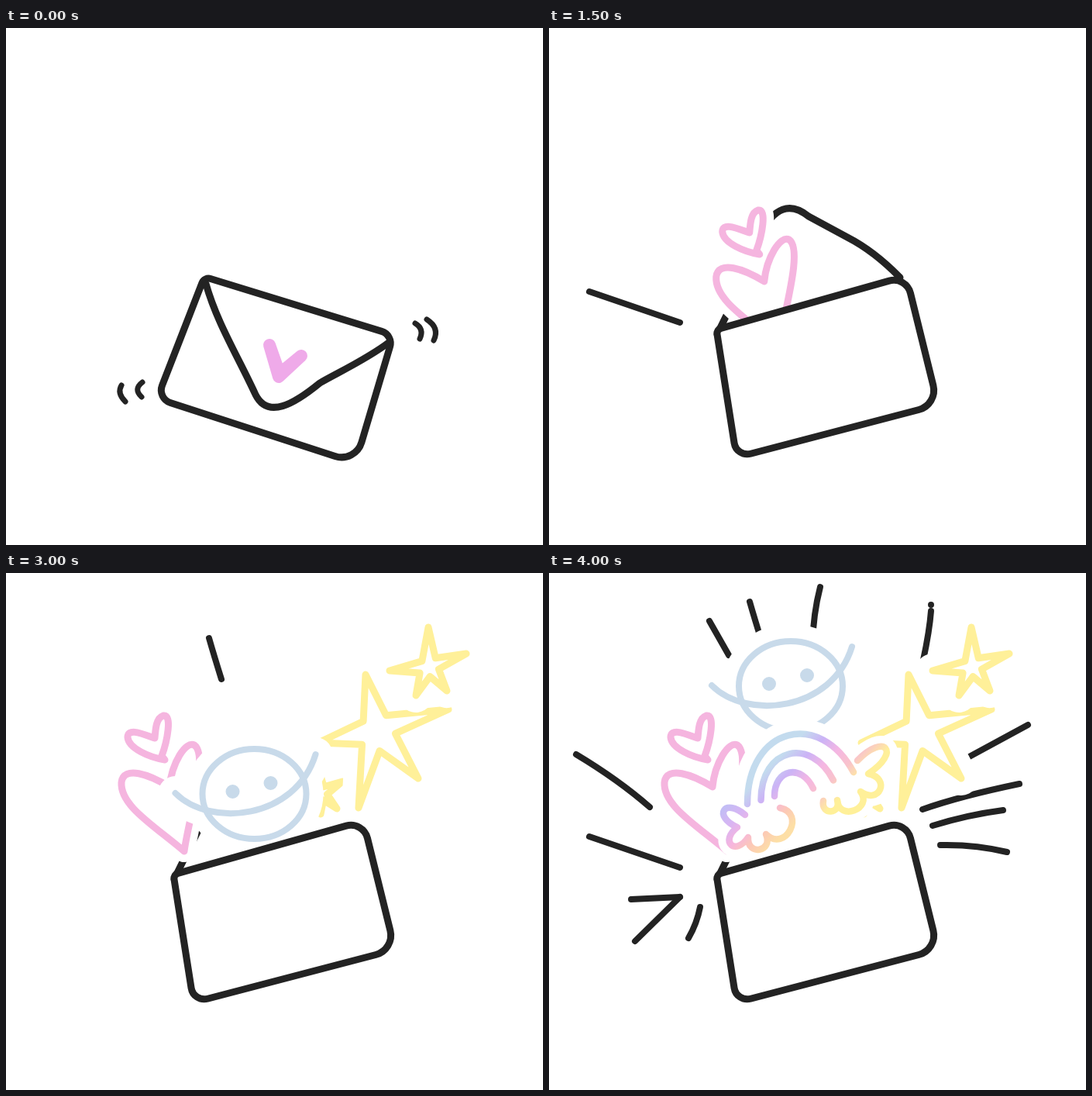
An HTML page with a canvas for the animation above (4.25 s loop, 693 by 667 pixels).

```html
<!DOCTYPE html>
<html>
<head>
<meta charset="utf-8">
<style>
html, body { margin: 0; width: 100%; height: 100%; overflow: hidden; background: #fff; }
canvas { display: block; }
</style>
</head>
<body>
<canvas id="stage" width="693" height="667"></canvas>
<script>
const ctx = document.getElementById('stage').getContext('2d');
const INK = '#232323', PINK = '#f5b5df', YELLOW = '#fff099', BLUE = '#c8daea';
const STEP = 250, STEPS = 17, FULL = 16;

const shape = d => new Path2D(d);
const mix = (a, b, k) => a.map((v, i) => v + (b[i] - v) * k);

// Closed quad; corners are [x, y, radius]
function roundedQuad(corners) {
  const path = new Path2D();
  path.moveTo(...mix(corners[3], corners[0], 0.5).slice(0, 2));
  corners.forEach(([x, y, r], i) => path.arcTo(x, y, ...corners[(i + 1) % 4].slice(0, 2), r));
  path.closePath();
  return path;
}

// Five tips; each notch lies between two tips, pulled towards the centre
function star(centre, tips) {
  const path = new Path2D();
  tips.forEach((tip, i) => {
    path.lineTo(...tip);
    path.lineTo(...mix(mix(tip, tips[(i + 1) % 5], 0.5), centre, 0.65));
  });
  path.closePath();
  return path;
}

// Row of bumps from start; each bump is [end x, end y, depth]
function cloud(start, bumps) {
  const path = new Path2D();
  path.moveTo(...start);
  let [x, y] = start;
  for (const [ex, ey, depth] of bumps) {
    const dx = ex - x, dy = ey - y, h = depth / 0.75 / Math.hypot(dx, dy);
    path.bezierCurveTo(x - dx / 4 - dy * h, y - dy / 4 + dx * h,
      ex + dx / 4 - dy * h, ey + dy / 4 + dx * h, ex, ey);
    [x, y] = [ex, ey];
  }
  return path;
}

// Rainbow bands shrink evenly towards the innermost
function band(i) {
  const x1 = 256 + 17.5 * i, y1 = 298 - 5 * i;
  return shape(`M${x1},${y1} C${x1},${y1 - 100 + 32 * i} ${350 - 12 * i},${176 + 35 * i} ${393 - 26 * i},${257 + 10.5 * i}`);
}

function stroke(path, color, width) {
  ctx.strokeStyle = color;
  ctx.lineWidth = width;
  ctx.stroke(path);
}

// White paper cut-out around the paths
function cutout(paths, width) {
  ctx.fillStyle = '#fff';
  paths.forEach(path => { ctx.fill(path); stroke(path, '#fff', width); });
}

function shifted(dx, dy, draw) {
  ctx.save();
  ctx.translate(dx, dy);
  draw();
  ctx.restore();
}

// Evenly spaced colors along the diagonal, between two values of x + y
function diagonal(from, to, colors) {
  const g = ctx.createLinearGradient(from / 2, from / 2, to / 2, to / 2);
  colors.forEach((color, i) => g.addColorStop(i / (colors.length - 1), color));
  return g;
}

const letter = roundedQuad([[256, 321, 9], [500, 396, 16], [451, 561, 27], [195, 478, 17]]);
const letterFlap = shape('M258,330 C272,380 300,425 322,473 C338,505 372,485 405,458 C425,446 465,428 495,405');
const shakeMarks = shape('M149,461 Q143,471 154,482 M176,457 Q164,466 175,476 M528,381 Q540,388 534,401 M543,376 Q560,387 552,403');
const seal = shape('M340,409 L352,450 L381,423 L353,446 Z');

const body = roundedQuad([[216, 389, 7], [461, 320, 22], [502, 486, 26], [242, 554, 17]]);
const flap = shape('M217,395 L258,312 L273,266 Q299,214 335,243 L385,270 Q420,288 453,322');

const hearts = [
  shape('M211,276 C185,260 152,248 149,270 C147,300 190,325 230,359 C235,320 262,235 243,222 C232,216 214,245 211,276'),
  shape('M192,213 C177,208 157,199 157,212 C158,226 185,238 205,241 L201,236 C208,217 215,182 203,184 C194,187 193,200 192,213')
];
const stars = [
  star([406, 285], [[402, 248], [434, 269], [427, 304], [406, 311], [361, 291]]),
  star([476, 200], [[464, 131], [571, 176], [532, 265], [455, 303], [403, 219]]),
  star([546, 122], [[545, 70], [594, 104], [569, 152], [529, 158], [495, 126]])
];

const face = new Path2D();
face.ellipse(312, 240, 67, 58, 0, 0, 2 * Math.PI);
const smile = shape('M210,239 C255,284 365,273 391,189');
const eyes = shape('M284,237 h0 M333,226 h0');

const bands = [0, 1, 2].map(band);
const leftCloud = cloud([253, 312], [[243, 328, 26], [257, 341, 22], [280, 337, 18], [298, 303, 25]]);
const rightCloud = cloud([354, 294], [[372, 293, 14], [402, 282, 20], [412, 259, 22], [398, 242, 38]]);
const rainbowInk = diagonal(535, 666, ['#c3dbee', '#cbb3f6', '#f4b6e3', '#f9c3cb', '#fff099']);
const cloudInk = diagonal(530, 640, ['#c3bdf5', '#d8b5f3', '#f6b5df', '#fcc9b6', '#fddfa6']);

// Burst lines with the steps in which they flash; all show in the last step
const burst = [
  ['M169,380 L52,340', 6, 7],
  ['M106,421 L169,418', 5, 7],
  ['M618,196 L535,241 M607,272 Q530,288 482,305', 9, 10],
  ['M493,41 h0 M493,49 Q491,75 483,112', 10],
  ['M35,234 Q90,267 130,302'],
  ['M111,475 L169,418 M505,351 Q550,350 591,360', 14],
  ['M180,471 Q191,452 195,431 M586,306 Q540,312 495,326', 15],
  ['M459,255 Q480,222 556,149', 8]
].map(([d, ...steps]) => [shape(d), steps]);
const ray = shape('M262,84 Q268,105 278,137');
const sideRays = shape('M210,109 L235,153 M353,65 Q344,100 343,139');

// Runs draw at the eased offset of a group rising from [dx, dy]
function emerge(step, start, duration, [dx, dy], draw) {
  if (step < start) return;
  const k = Math.min(1, (step - start) / duration);
  const left = (1 + Math.cos(Math.PI * k)) / 2;
  shifted(dx * left, dy * left, draw);
}

function drawClosed(tilted) {
  ctx.save();
  if (tilted) {
    ctx.translate(350, 433);
    ctx.rotate(-35 * Math.PI / 180);
    ctx.translate(-350, -433);
  }
  stroke(letter, INK, 9);
  stroke(letterFlap, INK, 9);
  stroke(shakeMarks, INK, 7);
  stroke(seal, '#efaae9', 16);
  ctx.restore();
}

function drawSmiley() {
  cutout([face, smile], 44);
  stroke(face, BLUE, 8);
  stroke(smile, BLUE, 8);
  stroke(eyes, BLUE, 18);
}

function drawRainbow() {
  cutout([bands[0]], 38);
  cutout([leftCloud, rightCloud], 28);
  bands.forEach(path => stroke(path, rainbowInk, 8.5));
  stroke(leftCloud, cloudInk, 8.5);
  stroke(rightCloud, rainbowInk, 8.5);
}

function drawOpen(step) {
  const last = step === FULL;
  burst.forEach(([path, steps], i) => {
    const flashOnly = i === burst.length - 1;
    if (steps.includes(step) || last && !flashOnly) stroke(path, INK, 8);
  });
  shifted(last ? -3 : 0, last ? -47 : 0, () => {
    if (step === 12 || step === 13 || last) stroke(ray, INK, 8);
    if (step === 13 || last) stroke(sideRays, INK, 8);
  });
  stroke(flap, INK, 9);

  emerge(step, 5, 3, [89, 68], () => {
    cutout(hearts, 28);
    hearts.forEach(path => stroke(path, PINK, 9));
  });
  emerge(step, 8, 2, [-127, 182], () => stars.forEach((path, i) => {
    cutout([path], i ? 44 : 66);
    stroke(path, YELLOW, 9);
  }));
  emerge(step, 11, 2, [17, 90], () => shifted(0, step > 13 ? -94 : 0, drawSmiley));
  emerge(step, 14, 2, [0, 88], drawRainbow);

  cutout([body], 0.1);
  stroke(body, INK, 9);
}

function frame() {
  const step = Math.floor(performance.now() / STEP) % STEPS;
  ctx.fillStyle = '#fff';
  ctx.fillRect(0, 0, 693, 667);
  ctx.lineCap = ctx.lineJoin = 'round';
  if (step < 4) drawClosed(step === 1 || step === 2);
  else drawOpen(step);
  requestAnimationFrame(frame);
}
frame();
</script>
</body>
</html>
```
